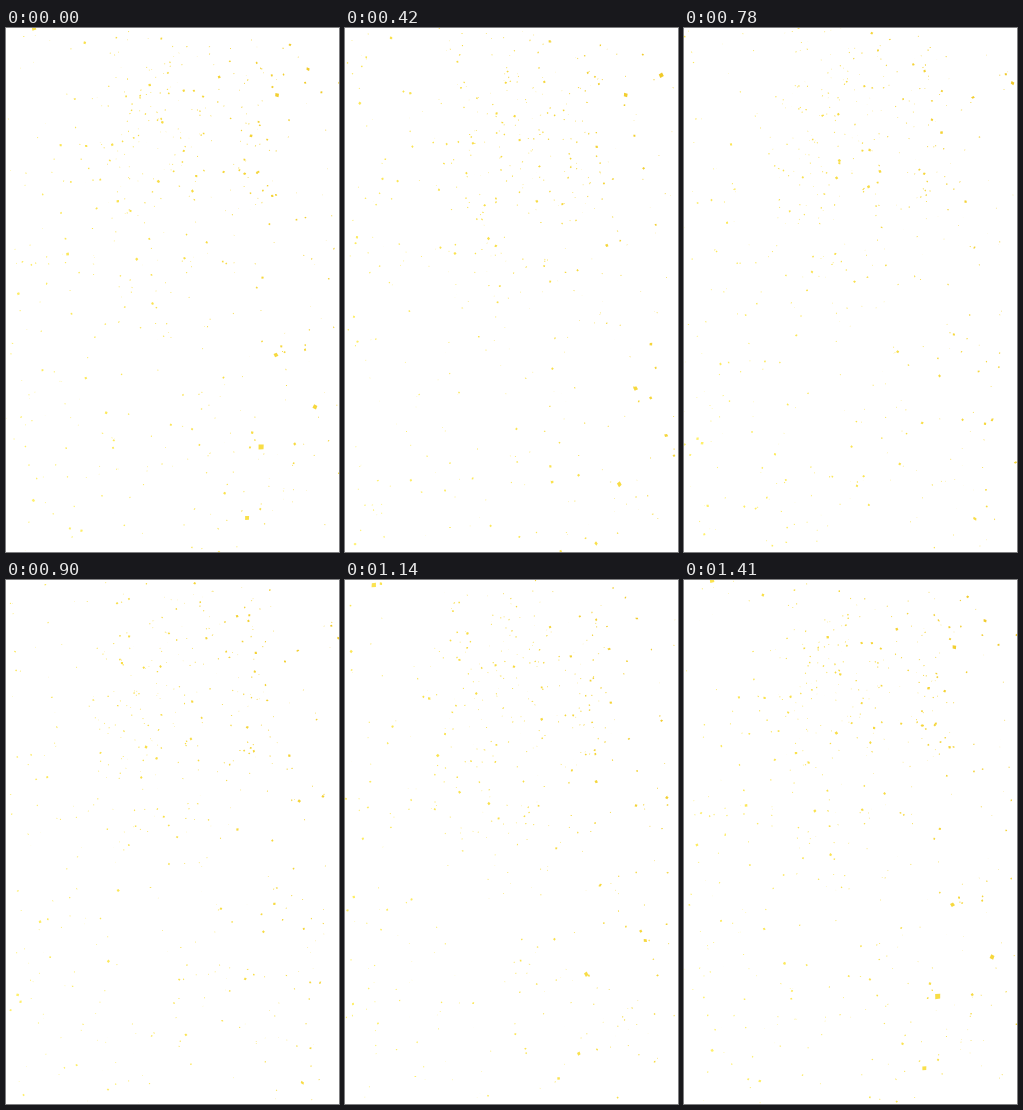
Recreate the animation shown at these times as an HTML page with a canvas. Size 333 by 524 pixels, loop 1.44 s.

```html
<!DOCTYPE html>
<html lang="en">
<head>
<meta charset="utf-8">
<title>Gold confetti</title>
<style>
  html, body { margin: 0; width: 100%; height: 100%; overflow: hidden; background: #fff; }
  canvas { display: block; }
</style>
</head>
<body>
<canvas id="stage" width="333" height="524"></canvas>
<script>
const W = 333, H = 524, LOOP = 1440, STEP = 30, TAU = Math.PI * 2;
const GRAVITY = 18, COUNT = 800;
const ctx = document.getElementById('stage').getContext('2d');

let seed = 7291;
function rnd() {
  seed = (seed + 0x6D2B79F5) | 0;
  let n = Math.imul(seed ^ (seed >>> 15), 1 | seed);
  n = (n + Math.imul(n ^ (n >>> 7), 61 | n)) ^ n;
  return ((n ^ (n >>> 14)) >>> 0) / 4294967296;
}
const range = (a, b) => a + (b - a) * rnd();
const bell = () => rnd() + rnd() + rnd() - 1.5;
const clamp = (v, a, b) => Math.min(b, Math.max(a, v));

// Dense cloud around the burst, a band to its right, a thinner fall below
function place() {
  const kind = rnd();
  if (kind < .24) return [162 + bell() * 85, 115 + bell() * 105];
  if (kind < .31) return [range(222, 266), range(0, 185)];
  if (kind < .6) return [range(0, W), range(0, 235)];
  return [range(0, W), range(215, H)];
}

// Pieces fly away from the burst; nearer ones (larger k) are faster
function speck() {
  const [x, y] = place();
  const k = range(.08, .2);
  return {
    x, y, k,
    vx: (x - 155) * k + range(-3, 3),
    vy: (y - 100) * k + range(-3, 4),
    size: 1.2 + 2.1 * rnd() ** 2.2,
    born: range(0, LOOP), mid: LOOP / 2,
    peak: range(0, LOOP), turns: 1 + Math.floor(rnd() * 2),
    low: -.4, angle: range(0, TAU)
  };
}

// Close pieces: place at time 0, velocity in px/s, size, time facing the viewer
function flake(x, y, vx, vy, size, peak) {
  return {
    x, y, vx, vy, size, peak, born: 1020, mid: 420,
    turns: 1, low: .25, angle: range(0, TAU)
  };
}

const pieces = [
  ...Array.from({ length: COUNT }, speck),
  flake(271, 67, 23, -4, 5, 210),
  flake(309, 379, 29, 64, 5, 0),
  flake(270, 327, 49, 76, 5, 210),
  flake(255, 419, 46, 85, 6.5, 60),
  flake(241, 490, 24, 57, 5, 0),
  flake(302, 41, 34, 11, 5, 420),
  flake(28, 0, -3, -14, 6, 1200)
];

// Deep gold at the top right, pale yellow at the left and bottom
function gold(x, y) {
  const deep = clamp(x / W * .7 + (1 - y / H) * .4 - .1, 0, 1);
  return `hsl(${54 - deep * 6}, ${100 - deep * 14}%, ${71 - deep * 17}%)`;
}

function drawPiece(p, t) {
  const age = (t - p.born + LOOP) % LOOP;
  const s = (age - p.mid) / 1000;
  const x = p.x + p.vx * s;
  const y = p.y + p.vy * s + GRAVITY * s * s / 2;
  const face = Math.cos((t - p.peak) / LOOP * p.turns * TAU);
  const show = p.low + (1 - p.low) * (face + 1) / 2;
  if (show <= 0) return;

  const life = age / LOOP;
  const grow = Math.min(1, 12 * life * (1 - life));
  const a = p.size * grow * (.6 + .4 * show) / 2;
  const b = a * (.45 + .5 * show);
  ctx.save();
  ctx.translate(x, y);
  ctx.rotate(p.angle + face * .6);
  ctx.fillStyle = gold(x, y);
  ctx.beginPath();
  ctx.moveTo(-a, -b * .6);
  ctx.lineTo(a * .4, -b);
  ctx.lineTo(a, b * .5);
  ctx.lineTo(-a * .5, b);
  ctx.fill();
  ctx.restore();
}

function draw(now) {
  const t = Math.floor(now % LOOP / STEP) * STEP;
  ctx.clearRect(0, 0, W, H);
  for (const p of pieces) drawPiece(p, t);
}

let start;
function tick(now) {
  start ??= now;
  draw(now - start);
  requestAnimationFrame(tick);
}
draw(0);
requestAnimationFrame(tick);
</script>
</body>
</html>
```
